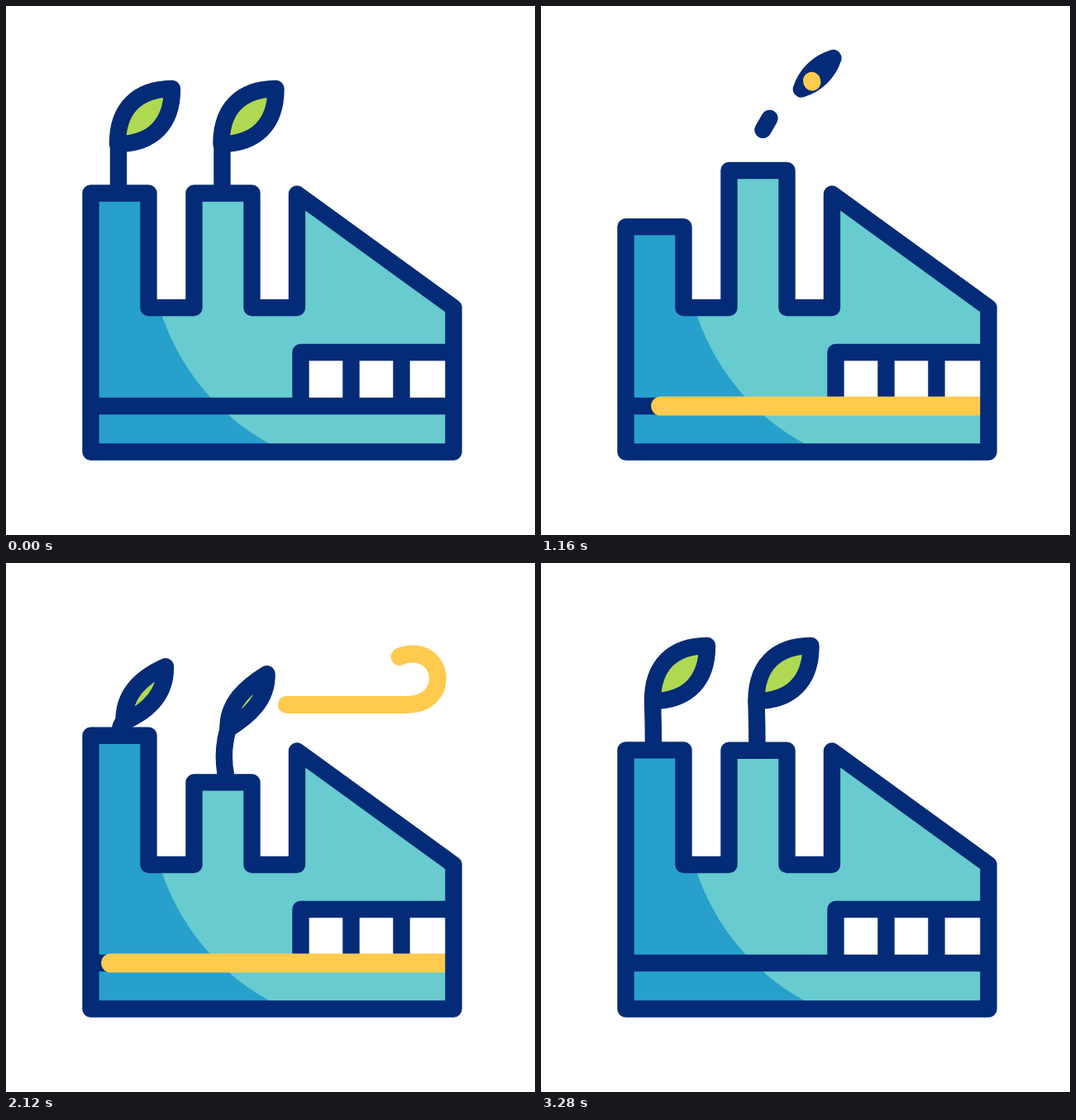
These frames come from a looping animation (640 by 640 pixels, 3340 ms). An HTML page:

```html
<!DOCTYPE html>
<html lang="en">
<head>
<meta charset="utf-8">
<title>Green factory</title>
<style>
  html, body { margin: 0; width: 100%; height: 100%; overflow: hidden; background: #fff; }
  svg { display: block; width: 100%; height: 100%; }
  path { stroke-linecap: round; stroke-linejoin: round; }
  .line { fill: none; stroke: #032b77; stroke-width: 20.4; }
  .leaf { fill: #afd952; stroke: #032b77; }
  .wind { fill: none; stroke: #ffcb4e; stroke-width: 21; }
</style>
</head>
<body>
<svg viewBox="0 0 640 640">
  <clipPath id="walls"><path id="wallShape"/></clipPath>
  <path class="line" id="stem0"/><path class="leaf" id="leaf0"/>
  <path class="line" id="stem1"/><path class="leaf" id="leaf1"/>
  <g clip-path="url(#walls)">
    <rect width="640" height="640" fill="#27a0cc"/>
    <circle cx="453" cy="285" r="279" fill="#67cbcf"/>
    <path fill="#fff" d="M356 419H541V484H356Z"/>
    <path class="line" d="M102 484H541M356.500 484V419H541M417.500 419V484M478.500 419V484"/>
    <path class="wind" id="belt" style="stroke-width:23"/>
  </g>
  <path class="line" id="outline"/>
  <path class="wind" id="gust0" pathLength="1"
    d="M163 118H354C399 118 399 53 358 53C332 53 321 72 328 92"/>
  <path class="wind" id="gust1" pathLength="1"
    d="M290 171.500H485C535 171.500 532 110 492 110Q483 110 476 113.500"/>
</svg>
<script>
const LOOP = 3340;
const $ = id => document.getElementById(id);
const mix = (a, b, u) => a + (b - a) * u;
const ease = u => (1 - Math.cos(Math.PI * u)) / 2;
const ramp = (t, from, to) => Math.min(1, Math.max(0, (t - from) / (to - from)));
const sweep = (t, from, to) => ease(ramp(t, from, to));

// Height of a chimney top, passing two turning points.
function chimney(t, first, second) {
  if (t < 1390) return mix(226.5, first, sweep(t, 0, 1390));
  if (t < 1900) return mix(first, second, sweep(t, 1390, 1900));
  return mix(second, 226.5, ease(ramp(t, 1900, LOOP) ** 1.1));
}

// Leaf between base b and tip p: half width w, sideways bend s.
function leafPath(b, p, w, s) {
  const dx = p[0] - b[0], dy = p[1] - b[1], len = Math.hypot(dx, dy) || 1;
  const at = (along, side) =>
    [b[0] + dx * along + dy / len * side, b[1] + dy * along - dx / len * side];
  return `M${b}C${at(.32, w + s)} ${at(.68, w - s)} ${p}C${at(.68, -w - s)} ${at(.32, s - w)} ${b}Z`;
}

function plant(i, t, top) {
  const x = i * 125.5, leaf = $('leaf' + i), stem = $('stem' + i);
  let base, tip, w, bend = 0, stroke = 20.4, stemD = '';
  if (t < 1400) {
    // Torn off and carried away
    const k = Math.max(0, (t - (i ? 775 : 300)) / 385);
    const left = Math.min(1, Math.max(0, (1.5 - k) / .5));
    tip = [201 + x + 27 * k, 100 - 37 * k];
    base = [mix(tip[0], 135 + x + 54 * k, left), mix(tip[1], 167 - 66 * k, left)];
    w = Math.max(0, 30 - 21 * k ** 1.4);
    stroke *= left;
    const foot = k ? Math.min(top, 226 - 76 * k) : top;
    if (k < 1.3) stemD = `M${136 + x + 15 * k} ${167 - 31 * k}L${136 + x + 7 * k} ${foot}`;
  } else {
    // Sprouting again out of the chimney
    const r = (i ? 96 : 71) * (Math.max(0, 2860 - t) / 1240) ** 2
      + .0025 * Math.max(0, 1620 - t) ** 2;
    const lean = Math.min(8, .3 * r);
    tip = [201 + x - .32 * r, 100 + r];
    base = [135 + x + lean, 167 + r];
    w = 30 * Math.exp(-r / 50);
    bend = Math.min(9, .12 * r);
    if (base[1] < top)
      stemD = `M${base}Q${136 + x - lean / 4} ${(base[1] + top) / 2} ${136 + x + lean * .8} ${top}`;
  }
  leaf.setAttribute('d', stroke ? leafPath(base, tip, w, bend) : '');
  leaf.setAttribute('stroke-width', stroke);
  stem.setAttribute('d', stemD);
}

function gust(i, t, start, drawn, leave, end) {
  const el = $('gust' + i);
  const head = sweep(t, start, drawn), tail = Math.min(.995, sweep(t, leave, end));
  el.style.display = t > start && t < end ? '' : 'none';
  el.style.strokeDasharray = `${Math.max(.001, head - tail)} 9`;
  el.style.strokeDashoffset = -tail;
}

// The light runs along the wall to the right, then back.
function belt(t) {
  const back = t > 1640;
  const a = back ? mix(545, 102, sweep(t, 1640, 2207)) : mix(102, 542, sweep(t, 1040, 1640));
  const b = back ? mix(545, 102, sweep(t, 2210, 3065)) : mix(102, 542, sweep(t, 450, 1030));
  const on = t > 450 && t < 3065;
  $('belt').setAttribute('d', on ? `M${a} 484H${b + .01}` : '');
}

function draw(now) {
  const t = now % LOOP;
  const tops = [chimney(t, 270, 208), chimney(t, 197, 267)];
  const walls = `M102.500 539.500V${tops[0]}H172.500V365H227.500V${tops[1]}H297.500V365H352V227.500L541.500 365V539.500Z`;
  $('wallShape').setAttribute('d', walls);
  $('outline').setAttribute('d', walls);
  tops.forEach((top, i) => plant(i, t, top));
  belt(t);
  gust(0, t, 260, 740, 500, 1175);
  gust(1, t, 1680, 2070, 1960, 2580);
}

const begin = performance.now();
function frame() {
  draw(performance.now() - begin);
  requestAnimationFrame(frame);
}
frame();
</script>
</body>
</html>
```
